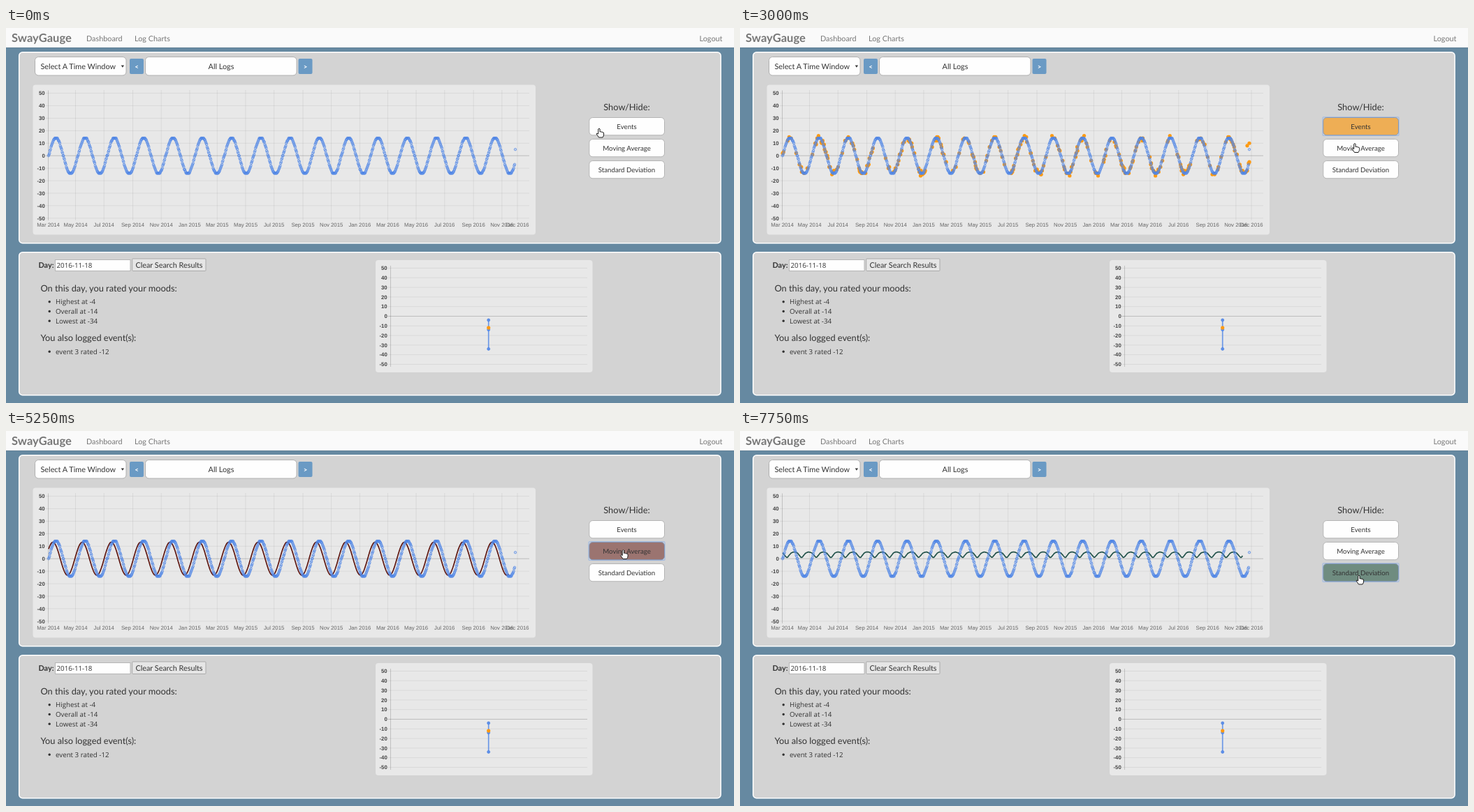
An HTML page for the animation above (8 s loop, 1042x538 px).

```html
<!DOCTYPE html>
<html lang="en">
<head>
<meta charset="utf-8">
<title>Mood log charts</title>
<style>
html, body { margin: 0; width: 100%; height: 100%; overflow: hidden; background: #6689a1; }
svg { display: block; width: 1042px; height: 538px; font: 10.85px Lato, sans-serif; fill: #333; text-rendering: geometricPrecision; }
.axis { font: 7.75px "Liberation Sans", Arial, sans-serif; fill: #666; }
.scale { font-weight: bold; fill: #444; }
.list { font: 9.75px "Open Sans", sans-serif; }
.head { font-size: 12.8px; }
.small { font-size: 9.7px; }
.nav { fill: #777; }
</style>
</head>
<body>
<svg id="stage" viewBox="0 0 1042 538"></svg>
<script>
const stage = document.getElementById('stage');

function add(tag, attrs, parent = stage) {
  const node = document.createElementNS('http://www.w3.org/2000/svg', tag);
  for (const key in attrs) node.setAttribute(key, attrs[key]);
  parent.appendChild(node);
  return node;
}
const group = (attrs = {}) => add('g', attrs);
const box = (x, y, width, height, rx, fill, stroke = 'none', sw = 1) =>
  add('rect', { x, y, width, height, rx, fill, stroke, 'stroke-width': sw });
const line = (x1, y1, x2, y2, alpha = 0.1) =>
  add('path', { d: `M${x1} ${y1}L${x2} ${y2}`, stroke: `rgba(0,0,0,${alpha})` });
const dot = (cx, cy, r, attrs, parent) => add('circle', { cx, cy, r, ...attrs }, parent);
function text(x, y, content, cls = '', anchor = 'start', attrs = {}) {
  add('text', { x, y, class: cls, 'text-anchor': anchor, ...attrs }).textContent = content;
}

// Page frame
box(0, 0, 1042, 28, 0, '#fafafa');
line(0, 28, 1042, 28, 0.12);
text(8, 20.3, 'SwayGauge', 'nav', 'start', { style: 'font-size:16.5px;font-weight:bold' });
text(115, 18.5, 'Dashboard', 'nav');
text(184, 18.5, 'Log Charts', 'nav');
text(1025.5, 18.5, 'Logout', 'nav', 'end');
box(18.7, 34.7, 1004.4, 274, 5, '#d3d3d3', '#fff', 1.5);
box(18.7, 321.7, 1004.4, 205, 5, '#d3d3d3', '#fff', 1.5);

// Time window controls
box(41.5, 41.5, 130.5, 26.5, 5, '#fefefe', '#b0b0b0');
text(49.5, 59, 'Select A Time Window');
add('path', { d: 'M164.7 53.5h4.4l-2.2 3.2z' });
box(199.5, 41.5, 216.5, 26.5, 5, '#fefefe', '#b0b0b0');
text(308, 59, 'All Logs', '', 'middle');
[[177, '<'], [418.5, '>']].forEach(([x, sign]) => {
  box(x, 44, 20, 22, 2, '#6a9ac4');
  text(x + 10, 58.5, sign, 'small', 'middle', { style: 'fill:#fff;font-weight:bold' });
});

// Chart background with its value scale
function chart(x, y, w, h, axisX, right, zero, unit, bottom) {
  box(x, y, w, h, 4, '#e8e8e8');
  for (let v = -50; v <= 50; v += 10) {
    const gy = zero - v * unit;
    line(axisX - 4, gy, right, gy, v ? 0.065 : 0.19);
    text(axisX - 4.8, gy + 2.7, v, 'axis scale', 'end');
  }
  line(axisX, y + 8, axisX, bottom, 0.17);
}
chart(38.5, 81.5, 719.5, 215, 60.5, 749, 183.2, 1.793, 276);
chart(529, 333, 310.5, 161, 550.5, 832, 413.5, 1.38, 486);

const DAY = 0.667, months = ['Jan', 'Mar', 'May', 'Jul', 'Sep', 'Nov'];
const monthX = n => 99.5 + DAY * (Date.UTC(2014, n) - Date.UTC(2014, 4)) / 864e5;
for (let n = 2; n <= 34; n += 2) {
  const x = n === 2 ? 60.5 : monthX(n);
  if (n > 2) line(x, 89, x, 276, 0.065);
  text(x, 284.7, `${months[n / 2 % 6]} ${2014 + Math.floor(n / 12)}`, 'axis', 'middle');
}
line(732, 89, 732, 276, 0.065);
text(732, 284.7, 'Dec 2016', 'axis', 'middle');

// Series, from back to front
const px = day => 61 + day * DAY;
const py = value => 183.2 - value * 1.793;
const mood = day => Math.trunc(15 * Math.sin(day / 10));
const WINDOW = 14;
function stats(day) {
  const values = Array.from({ length: WINDOW }, (_, k) => mood(day + k));
  const mean = values.reduce((a, b) => a + b) / WINDOW;
  const variance = values.reduce((sum, v) => sum + (v - mean) ** 2, 0) / WINDOW;
  return { mean, deviation: Math.sqrt(variance) };
}
function curve(key, stroke) {
  let d = '';
  for (let i = 0; i <= 987; i++) d += `${i ? 'L' : 'M'}${px(i).toFixed(2)} ${py(stats(i)[key]).toFixed(2)}`;
  return add('path', { d, fill: 'none', stroke, 'stroke-width': 1.7 });
}
const average = curve('mean', '#5e1712');
const deviation = curve('deviation', '#22524a');

let seed = 7;
const random = () => (seed = seed * 16807 % 2147483647) / 2147483647;
const events = group({ fill: '#fd9a12' });
for (let i = 0; i <= 1000; i++) {
  if (random() < 0.28) dot(px(i), py(mood(i) + Math.round(random() * 4 - 2)), 2.6, {}, events);
}
[[726, 8], [729, 10], [729, -5]].forEach(([x, v]) => dot(x, py(v), 2.6, {}, events));

const moods = group({ fill: '#6fa0f0', 'fill-opacity': 0.25, stroke: '#4b82e4', 'stroke-width': 0.9, 'stroke-opacity': 0.75 });
for (let i = 0; i <= 1000; i++) dot(px(i), py(mood(i)), 1.7, {}, moods);
dot(729, py(5), 1.7, {}, moods);

// Day details
text(46.5, 343.8, 'Day:', '', 'start', { style: 'font-weight:bold' });
box(70.5, 332.5, 107.5, 16, 0, '#fefefe', '#b5b5b5');
text(72.5, 343.8, '2016-11-18', 'list');
box(180.7, 331, 105.3, 17.5, 1, '#e6e6e6', '#a9a9a9');
text(233.5, 343.8, 'Clear Search Results', '', 'middle');
text(49.5, 378, 'On this day, you rated your moods:', 'head');
text(49.5, 449, 'You also logged event(s):', 'head');
[['Highest at -4', 392.5], ['Overall at -14', 406.2], ['Lowest at -34', 420], ['event 3 rated -12', 464]]
  .forEach(([label, y]) => {
    dot(62.2, y + 0.3, 1.7);
    text(71, y + 3.5, label, 'list');
  });

const dayY = v => 413.5 - v * 1.38;
add('path', { d: `M690.7 ${dayY(-4)}V${dayY(-34)}`, stroke: '#6b97e6', 'stroke-width': 1.7 });
[-4, -14, -34].forEach(v => dot(690.7, dayY(v), 2, { fill: '#5f90e8', stroke: '#4b82e4', 'stroke-width': 0.7 }));
dot(690.7, dayY(-12), 2.6, { fill: '#fd9a12' });

// Toggle buttons: label, fill when on, time of focus, on, off
text(888.5, 118, 'Show/Hide:', 'head', 'middle');
const toggles = [
  ['Events', '#eeae55', 750, 1500, 3250],
  ['Moving Average', '#9b7470', 3250, 4500, 6000],
  ['Standard Deviation', '#6f8c80', 6000, 7250, 8000]
].map(([label, color, focus, on, off], i) => {
  const y = 128.5 + i * 31;
  const ring = box(834, y - 0.6, 109, 26.4, 1, 'none', '#a3bce2', 1.2);
  const face = box(834.8, y, 107.7, 25.3, 5, '#fefefe', '#b4b4b4');
  text(888.5, y + 16, label, 'small', 'middle');
  return { ring, face, color, focus, on, off };
});

const hand = add('path', {
  d: 'M-1.3 1Q0-.8 1.1 1V5Q2.2 4 3 5.3 4.3 4.5 5 5.8 6.5 5.3 6.6 7V9Q6.5 11 5 13H-.5Q-2 10.5-4 8-4 6.2-1.3 8Z',
  fill: '#fff', stroke: '#111', 'stroke-width': 0.95, 'stroke-linejoin': 'round'
});
// time, x, y
const path = [
  [0, 849, 144], [250, 869.5, 148.5], [3000, 880, 165.5], [3250, 885, 170.5],
  [5250, 883.5, 170.5], [5750, 884, 188], [6000, 885, 207], [7250, 886, 207]
];

const clamp = v => Math.max(0, Math.min(1, v));
const fade = (t, start, rise, end) => end && t >= end ? clamp(1 - (t - end) / 1000) : clamp((t - start) / rise);

function draw(now) {
  const t = Math.floor(now % 8000 / 250) * 250;
  events.setAttribute('opacity', fade(t, 1250, 1250, 3000));
  average.setAttribute('opacity', fade(t, 4250, 1000, 5750));
  deviation.setAttribute('opacity', fade(t, 7000, 750));
  toggles.forEach(b => {
    const focused = t >= b.focus && t < b.off;
    b.ring.setAttribute('opacity', focused ? 1 : 0);
    b.face.setAttribute('fill', t >= b.on && t < b.off ? b.color : '#fefefe');
    b.face.setAttribute('stroke', focused ? '#8499bb' : '#b4b4b4');
  });
  const [, x, y] = path.filter(p => p[0] <= t).pop();
  hand.setAttribute('transform', `translate(${x} ${y})`);
}

const start = performance.now();
function tick() {
  draw(performance.now() - start);
  requestAnimationFrame(tick);
}
tick();
</script>
</body>
</html>
```
